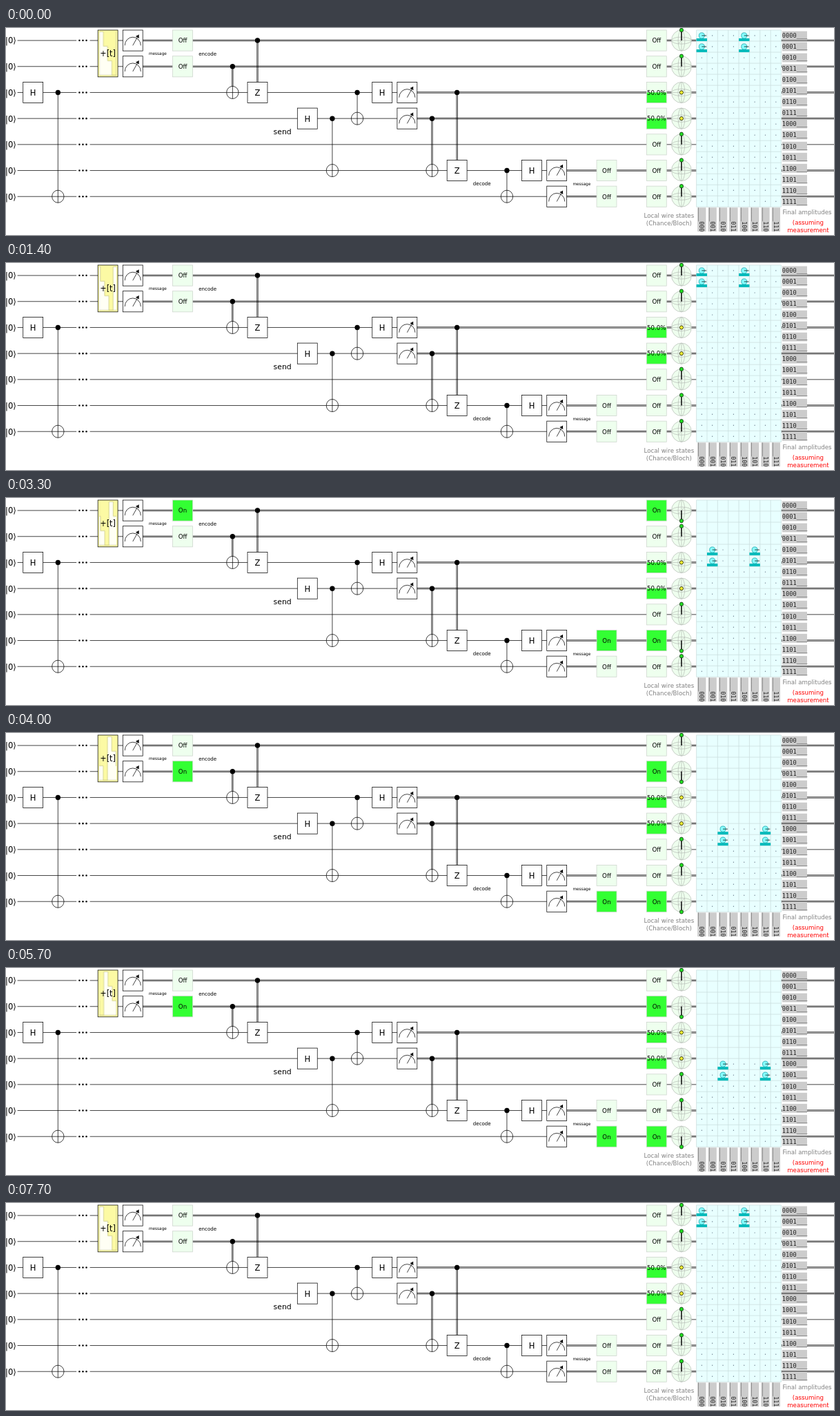
Recreate the animation shown at these times as an HTML page. Size 1200 by 300 pixels, loop 7800 ms.

```html
<!DOCTYPE html>
<html lang="en">
<head>
<meta charset="utf-8">
<title>Quantum circuit</title>
<style>
  html, body { margin: 0; width: 100%; height: 100%; overflow: hidden; background: #fff; }
  svg { display: block; width: 1200px; height: 300px; }
  text { font-family: "DejaVu Sans", sans-serif; text-anchor: middle; white-space: pre; }
  .mono { font-family: "DejaVu Sans Mono", monospace; text-anchor: start; }
  .box { fill: #fff; stroke: #000; }
  .line { fill: none; stroke: #000; }
  .chance { stroke: #ccd3cc; }
  .sphere { fill: #efe; stroke: #b8bdb8; }
  .vec { stroke: #000; stroke-width: 2; }
  .ball { fill: #2d2; stroke: #121; }

  /* one loop is 78 ticks of 100 ms; the staircase is already one tick in */
  .stairs { fill: #fffff4; stroke: #c9c884; animation: scroll 7.8s steps(78, end) infinite; }
  @keyframes scroll {
    from { transform: translateX(-0.4359px); }
    to { transform: translateX(-34.4359px); }
  }
  .state { visibility: hidden; animation: 7.8s step-end infinite; }
  .s0 { animation-name: s0; }
  .s1 { animation-name: s1; }
  .s2 { animation-name: s2; }
  .s3 { animation-name: s3; }
  @keyframes s0 { 0% { visibility: visible; } 24.3% { visibility: hidden; } 98.7%, 100% { visibility: visible; } }
  @keyframes s1 { 0% { visibility: hidden; } 24.3% { visibility: visible; } 48.7%, 100% { visibility: hidden; } }
  @keyframes s2 { 0% { visibility: hidden; } 48.7% { visibility: visible; } 74.3%, 100% { visibility: hidden; } }
  @keyframes s3 { 0% { visibility: hidden; } 74.3% { visibility: visible; } 98.7%, 100% { visibility: hidden; } }
</style>
</head>
<body>
<svg id="stage" viewBox="0 0 1660 398" preserveAspectRatio="none"></svg>
<script>
const X = c => 54.2 + 50 * c;   // column centre
const Y = r => 24 + 50 * r;     // wire height
const CELL = 21.25, GX = X(27) - 20, GY = 4;

// ---- primitives, all returning markup ----
const rect = (x, y, w, h, attrs) => `<rect x="${x}" y="${y}" width="${w}" height="${h}" ${attrs}/>`;
const circle = (x, y, r, attrs) => `<circle cx="${x}" cy="${y}" r="${r}" ${attrs}/>`;
const path = (d, attrs = 'class="line"') => `<path d="${d}" ${attrs}/>`;
const text = (s, x, y, size, attrs = '') =>
  `<text x="${x}" y="${y + size * 0.365}" font-size="${size}" ${attrs}>${s}</text>`;
const range = (n, fn) => Array.from({ length: n }, (_, i) => fn(i)).join('');

// ---- wires ----
const double = (x1, y1, x2, y2) => {
  const dx = x1 === x2 ? 1 : 0, dy = 1 - dx;
  return path(`M${x1 - dx} ${y1 - dy}L${x2 - dx} ${y2 - dy}M${x1 + dx} ${y1 + dy}L${x2 + dx} ${y2 + dy}`);
};
const measuredAt = [4, 4, 15, 15, null, 21, 21];
const wire = r => {
  const m = measuredAt[r], y = Y(r), end = m === null ? 1660 : X(m);
  return text('|0⟩', 9.6, y, 16) + path(`M23 ${y}H${end}`) +
    (m === null ? '' : double(end, y, 1660, y));
};
const dots = r => rect(X(2) - 13, Y(r) - 8, 27, 16, 'fill="#fff"') +
  range(3, i => circle(X(2) + (i - 1) * 7, Y(r), 1.7, ''));

// ---- gates ----
const gate = (s, c, r) => rect(X(c) - 20, Y(r) - 20, 40, 40, 'class="box"') + text(s, X(c), Y(r), 16);
const meter = (c, r) => {
  const x = X(c), y = Y(r) + 9.6, a = -Math.PI / 3;
  const px = x + 24 * Math.cos(a), py = y + 24 * Math.sin(a);
  const wing = s => `${px - 7 * Math.cos(a + s)} ${py - 7 * Math.sin(a + s)}`;
  return rect(x - 20, Y(r) - 20, 40, 40, 'class="box"') +
    path(`M${x - 16} ${y}A16 16 0 0 1 ${x + 16} ${y}M${x} ${y}L${px} ${py}`) +
    path(`M${px} ${py}L${wing(0.6)}L${wing(-0.6)}Z`, '');
};
const not = (c, r) => circle(X(c), Y(r), 12, 'class="box"') +
  path(`M${X(c) - 12} ${Y(r)}h24M${X(c)} ${Y(r) - 12}v24`);
const control = (c, from, to, classical, target) =>
  (classical ? double(X(c), Y(from), X(c), Y(to)) : path(`M${X(c)} ${Y(from)}V${Y(to)}`)) +
  circle(X(c), Y(from), 5, '') +
  (target === 'X' ? not(c, to) : gate(target, c, to));

const counter = () => {
  const x = X(3) - 17, y = 7, w = 34, h = 84;
  let d = `M${x} ${y + h}`;
  for (let i = 0; i < 12; i++) d += `V${y + h * (i % 4) / 3}H${x + w * (i + 1) / 4}`;
  return rect(X(3) - 20, 4, 40, 90, 'fill="#fcfaa4" stroke="#000"') +
    `<clipPath id="window">${rect(x, y, w, h, '')}</clipPath>` +
    `<g clip-path="url(#window)">${path(d + `V${y + h}Z`, 'class="stairs"')}</g>` +
    text('+[t]', X(3), 49, 15.5);
};

// ---- displays ----
const chance = (c, r, p) => {
  const x = X(c) - 20, y = Y(r) - 20;
  return rect(x, y, 40, 40, 'fill="#efe"') +
    (p ? rect(x, y + 40 * (1 - p), 40, 40 * p, 'fill="#3f3"') : '') +
    rect(x, y, 40, 40, 'class="chance" fill="none"') +
    text(p === 0.5 ? '50.0%' : p ? 'On' : 'Off', X(c), Y(r), 12);
};
const sphere = r => {
  const x = X(26), y = Y(r);
  const oval = (rx, ry) => `<ellipse cx="${x}" cy="${y}" rx="${rx}" ry="${ry}" class="sphere" style="fill:none"/>`;
  return circle(x, y, 20, 'class="sphere"') + oval(20, 6.7) + oval(6.7, 20) +
    path(`M${x - 20} ${y}h40M${x} ${y - 20}v40M${x - 6.7} ${y + 6.7}l13.4 -13.4`, 'class="sphere"');
};
const vector = (r, on) => {
  const tip = Y(r) + (on ? 20 : -20);
  return path(`M${X(26)} ${Y(r)}V${tip}`, 'class="vec"') + circle(X(26), tip, 3.6, 'class="ball"');
};
const mixed = r => circle(X(26), Y(r), 3.5, 'fill="#ff3" stroke="#000"');

const grid = () => {
  let d = '';
  for (let i = 0; i <= 8; i++) d += `M${GX + i * CELL} ${GY}v340`;
  for (let i = 0; i <= 16; i++) d += `M${GX} ${GY + i * CELL}h170`;
  return rect(GX, GY, 170, 340, 'fill="#e8ffff"') + path(d, 'fill="none" stroke="#c9dcdc"');
};
const label = (s, size, w) =>
  rect(0, -8.5, w, 17, 'fill="#ccc"') + text(s, 0, 0, size, 'class="mono" fill="#222"');
const bits = (n, len) => n.toString(2).padStart(len, '0');
const labels = () =>
  range(16, i => `<g transform="translate(1556 ${GY + (i + 0.5) * CELL})">${label(bits(i, 4) + '___', 12, 50)}</g>`) +
  range(8, i => `<g transform="translate(${GX + (i + 0.5) * CELL} 345.3) rotate(90)">${label('____' + bits(i, 3), 11, 46)}</g>`);

const amplitude = (k, row, col) => {
  const x = GX + (col + 0.5) * CELL, y = GY + (row + 0.5) * CELL;
  if (row >> 1 === 2 * k && col % 4 === k) {
    return rect(x - CELL / 2, y + CELL / 4, CELL, CELL / 4, 'fill="#0bb"') +
      circle(x, y, 5.5, 'fill="#8ff" stroke="#0a9aa0"') + path(`M${x} ${y}h9.5`);
  }
  return row * 8 + col > 33 * k ? circle(x, y, 0.9, 'fill="#678"') : '';
};

const state = k => {
  const hi = k & 1, lo = k >> 1;
  return `<g class="state s${k}">` +
    [[0, hi], [1, lo], [5, hi], [6, lo]].map(([r, on]) =>
      chance(r < 2 ? 6 : 23, r, on) + chance(25, r, on) + vector(r, on)).join('') +
    range(16, row => range(8, col => amplitude(k, row, col))) + '</g>';
};

// ---- assembly ----
const circuit =
  range(7, wire) + range(7, dots) +
  gate('H', 0, 2) + control(1, 2, 6, false, 'X') +
  counter() + meter(4, 0) + meter(4, 1) +
  control(8, 1, 2, true, 'X') + control(9, 0, 2, true, 'Z') +
  gate('H', 11, 3) + control(12, 3, 5, false, 'X') + control(13, 2, 3, false, 'X') +
  gate('H', 14, 2) + meter(15, 2) + meter(15, 3) +
  control(16, 3, 5, true, 'X') + control(17, 2, 5, true, 'Z') +
  control(19, 5, 6, false, 'X') + gate('H', 20, 5) + meter(21, 5) + meter(21, 6);

const captions =
  text('message', X(5), 49, 8) + text('encode', X(7), 49, 9.8) + text('send', X(10), 199, 15) +
  text('decode', X(18), 299, 9.8) + text('message', X(22), 299, 8) +
  ['Local wire states', '(Chance/Bloch)'].map((s, i) => text(s, X(25.5), 360.5 + 15 * i, 12, 'fill="#808080"')).join('') +
  text('Final amplitudes', 1606, 353.5, 12, 'fill="#808080"') +
  ['(assuming', 'measurement', 'deferred)'].map((s, i) => text(s, 1608, 373.5 + 15 * i, 12, 'fill="#f00"')).join('');

document.getElementById('stage').innerHTML =
  circuit + range(7, sphere) + chance(25, 2, 0.5) + chance(25, 3, 0.5) + chance(25, 4, 0) +
  mixed(2) + mixed(3) + vector(4, 0) + grid() + labels() + captions + range(4, state);
</script>
</body>
</html>
```
